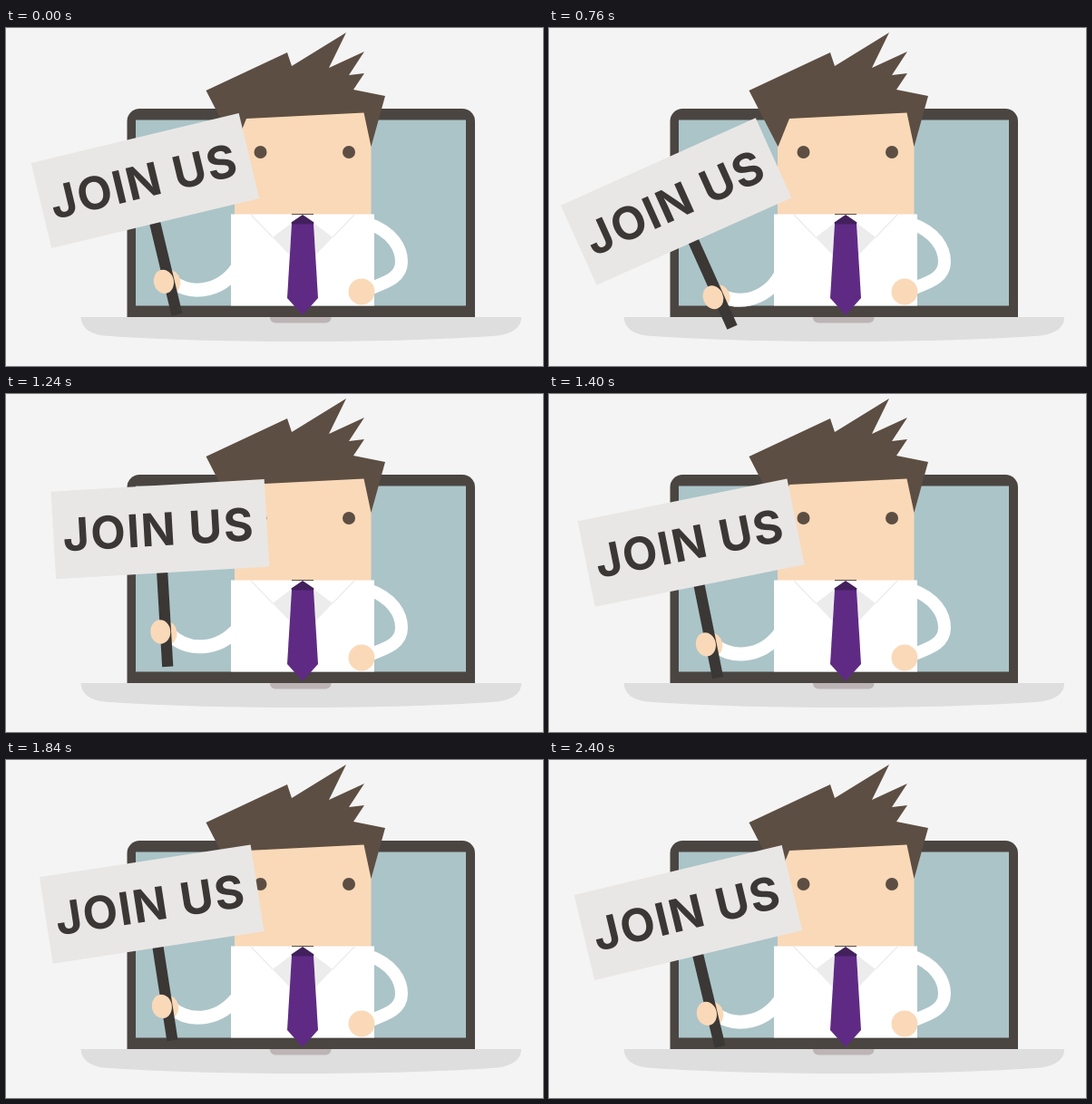
Recreate the animation shown at these times as an HTML page with a canvas. Size 592 by 373 pixels, loop 3.8 s.

```html
<!DOCTYPE html>
<html lang="en">
<head>
<meta charset="utf-8">
<title>Join us</title>
<style>
  html, body { margin: 0; width: 100%; height: 100%; overflow: hidden; background: #f4f4f4; }
  canvas { display: block; }
</style>
</head>
<body>
<canvas id="stage" width="592" height="373"></canvas>
<script>
const ctx = document.getElementById('stage').getContext('2d');
const LOOP = 3800, STEP = 40;
const SHOULDER = { x: 270, y: 251 };
const REST = -13.5, LOW = -26.5, HIGH = -2.8;

const C = {
  back: '#f4f4f4', frame: '#4a4541', screen: '#abc4c8', base: '#dedede', notch: '#bdb4b6',
  skin: '#fad9b8', hair: '#5d4e43', white: '#ffffff', shade: '#ececec',
  tie: '#5f2a84', knot: '#42205c', sign: '#e9e7e5', ink: '#3a3735'
};

// Cubic bezier easing from (0,0) to (1,1)
function bezier(x1, y1, x2, y2) {
  const at = (a, b, s) => 3 * (1 - s) * (1 - s) * s * a + 3 * (1 - s) * s * s * b + s * s * s;
  return p => {
    let lo = 0, hi = 1;
    for (let i = 0; i < 24; i++) {
      const mid = (lo + hi) / 2;
      if (at(x1, x2, mid) < p) lo = mid; else hi = mid;
    }
    return at(y1, y2, lo);
  };
}
const easeIn = bezier(1 / 3, 0, 5 / 6, 5 / 6);
const easeOut = bezier(1 / 6, 1 / 6, 2 / 3, 1);
const linear = p => p;

// Keys are [time, value, easing towards this key]
function track(keys, t) {
  if (t <= keys[0][0]) return keys[0][1];
  for (let i = 1; i < keys.length; i++) {
    const [t0, v0] = keys[i - 1], [t1, v1, ease] = keys[i];
    if (t < t1) return v0 + (v1 - v0) * ease((t - t0) / (t1 - t0));
  }
  return keys[keys.length - 1][1];
}

const swing = [
  [520, REST], [800, LOW, easeIn], [1200, HIGH, easeOut],
  [1600, LOW, easeIn], [2000, HIGH, easeOut], [2400, REST, easeIn]
];
const blink = [
  [200, 1], [400, 0.1, linear], [600, 1, linear],
  [2000, 1, linear], [2200, 0.1, linear], [2400, 1, linear]
];

function rect(color, x, y, w, h, radii = 0) {
  ctx.fillStyle = color;
  ctx.beginPath();
  ctx.roundRect(x, y, w, h, radii);
  ctx.fill();
}

function poly(color, ...pts) {
  ctx.fillStyle = color;
  ctx.beginPath();
  for (let i = 0; i < pts.length; i += 2) ctx.lineTo(pts[i], pts[i + 1]);
  ctx.fill();
}

function oval(color, x, y, rx, ry = rx) {
  ctx.fillStyle = color;
  ctx.beginPath();
  ctx.ellipse(x, y, rx, ry, 0, 0, Math.PI * 2);
  ctx.fill();
}

function stroke(color, width, d) {
  ctx.strokeStyle = color;
  ctx.lineWidth = width;
  ctx.stroke(new Path2D(d));
}

function drawLaptop() {
  rect(C.frame, 133.5, 89, 383.5, 230, [14, 14, 0, 0]);
  rect(C.screen, 143, 101.5, 364, 205);
  ctx.fillStyle = C.base;
  ctx.fill(new Path2D('M82.5 319C83 331 93 338 108 339.5C160 343.5 240 346 325 346' +
    'C410 346 490 343.5 542 339.5C558 337 568 331 568 319Z'));
  rect(C.notch, 291, 319, 67.5, 6.5, [0, 0, 6, 6]);
}

function drawHead(open) {
  rect(C.skin, 252, 90, 150.5, 116);
  poly(C.hair, 220.5, 69, 310, 27, 315, 42, 375, 5, 356, 44, 395, 26, 378, 52,
    395, 50, 383, 68, 418, 75, 402.5, 131, 394.5, 93.5, 265, 100, 252.5, 131);
  for (const x of [280.5, 378]) oval(C.hair, x, 137, 7, 7 * open);
}

// One half of the collar; side is -1 for left, 1 for right
function drawCollar(side) {
  const x = d => 327 + side * d;
  poly(C.shade, x(33), 231, x(12), 215, x(14), 251);
  stroke(C.shade, 1.3, `M${x(57)} 206L${x(33)} 231`);
}

function drawBody() {
  stroke(C.white, 14, 'M400 216C426 225 436 243 436 258C436 276 418 281 400 288');
  rect(C.white, 248, 205.5, 158, 101);
  drawCollar(-1);
  drawCollar(1);
  rect(C.hair, 315, 205, 24, 1);
  poly(C.tie, 315, 216, 339, 216, 344, 298, 327, 317, 310, 298);
  poly(C.knot, 327, 206, 339.5, 214.5, 339, 216.5, 315, 216.5, 314.5, 214.5);
  oval(C.skin, 392, 291, 14.5);
}

function drawSign(angle) {
  ctx.save();
  ctx.translate(SHOULDER.x, SHOULDER.y);
  ctx.rotate(angle * Math.PI / 180);
  stroke(C.white, 15, 'M-91 8C-72 30 -38 31 -14 6');
  oval(C.skin, -92, 7.5, 10, 12.5);
  rect(C.ink, -100.6, -70, 12.2, 114.5);
  oval(C.skin, -100.2, 5.7, 11, 13.2);
  rect(C.sign, -211.8, -155.8, 235.5, 96.6);
  ctx.fillStyle = C.ink;
  ctx.font = '700 50px Inter, Lato, sans-serif';
  ctx.letterSpacing = '1.5px';
  ctx.textAlign = 'center';
  ctx.fillText('JOIN US', -95.8, -89.3);
  ctx.restore();
}

function draw(now) {
  const t = Math.floor((now % LOOP) / STEP) * STEP;
  rect(C.back, 0, 0, 592, 373);
  drawLaptop();
  drawHead(track(blink, t));
  drawBody();
  drawSign(track(swing, t));
}

const start = performance.now();
function tick() {
  draw(performance.now() - start);
  requestAnimationFrame(tick);
}
tick();
</script>
</body>
</html>
```
